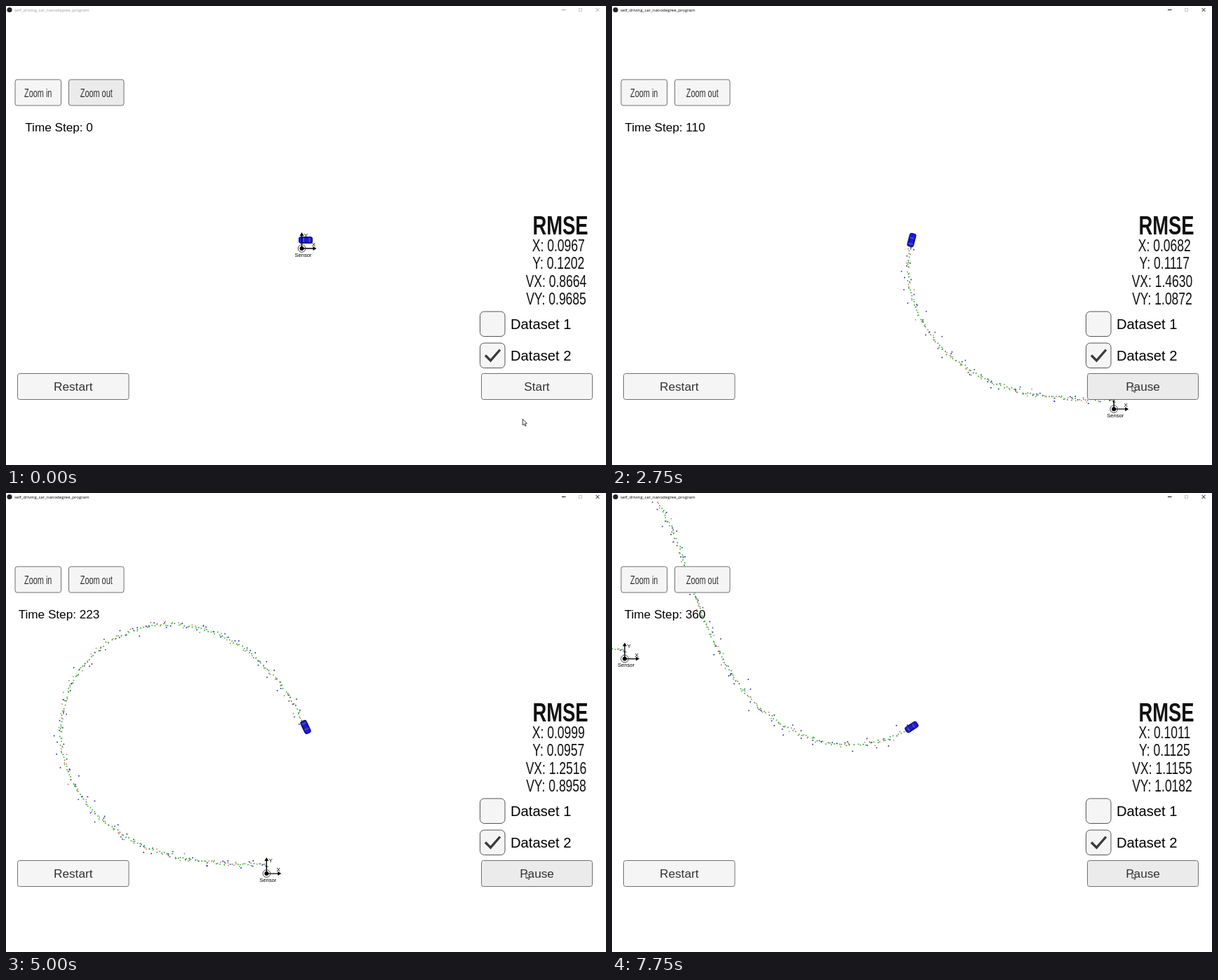
Animation, 855 px wide and 655 px high, one loop 8 s. Source, as an HTML page with a canvas:

```html
<!DOCTYPE html>
<html>
<head>
<meta charset="utf-8">
<style>
  html, body { margin: 0; width: 100%; height: 100%; overflow: hidden; background: #fff; }
  canvas { display: block; }
</style>
</head>
<body>
<canvas id="stage" width="855" height="655"></canvas>
<script>
const ctx = document.getElementById('stage').getContext('2d');
const LOOP = 8000, HOLD = 250, STEPS = 360;
const CAR = { x: 427, y: 334 };
const SANS = '"Liberation Sans", Arial, sans-serif';

// The car swings its heading like a pendulum at a nearly constant speed
const heading = step => 5.341 - 2.182 * Math.cos((step + 1) / 79.4);
const speed = step => 4.02 - .13 * Math.cos((step - 25) / 35);

// Car positions relative to the sensor
const path = [[5.5, -12]];
for (let k = 0; k < STEPS; k++) {
  const [x, y] = path[k], angle = heading(k + .5), length = speed(k + .5);
  path.push([x + length * Math.cos(angle), y + length * Math.sin(angle)]);
}

// Key readings: step, then X, Y, VX, VY
const readings = [
  [60, .0701, .1112, 1.8550, 1.2013],
  [110, .0682, .1117, 1.4630, 1.0872],
  [173, .0908, .0985, 1.2812, .9455],
  [260, .1067, .0936, 1.2297, .8590],
  [360, .1011, .1125, 1.1155, 1.0182]
];
const previousRun = [.0967, .1202, .8664, .9685];

function rmse(step) {
  if (step < 1) return previousRun;
  const i = readings.findIndex(row => row[0] >= step);
  const [end, ...values] = readings[i];
  // Velocity errors start high and settle with the number of samples
  if (i === 0) return values.map((v, k) => k > 1 ? v * Math.sqrt(end / step) : v);
  const [start, ...before] = readings[i - 1];
  return values.map((v, k) => before[k] + (v - before[k]) * (step - start) / (end - start));
}

function random(seed) {
  const v = Math.sin(seed * 12.9898) * 43758.5453;
  return v - Math.floor(v);
}
const noise = seed => random(seed) + random(seed + .31) + random(seed + .67) - 1.5;

function text(str, x, y, size, { color = '#000', align = 'center', squeeze = 1, font = SANS, weight = '' } = {}) {
  ctx.save();
  ctx.translate(x, y);
  ctx.scale(squeeze, 1);
  ctx.font = `${weight} ${size}px ${font}`;
  ctx.textAlign = align;
  ctx.fillStyle = color;
  ctx.fillText(str, 0, 0);
  ctx.restore();
}

function box(x, y, w, h, r, fill, stroke) {
  ctx.beginPath();
  ctx.roundRect(x, y, w, h, r);
  ctx.fillStyle = fill;
  ctx.fill();
  ctx.strokeStyle = stroke;
  ctx.stroke();
}

function poly(points, { fill, stroke, width = 1, close = false }) {
  ctx.beginPath();
  points.forEach(([x, y]) => ctx.lineTo(x, y));
  if (close) ctx.closePath();
  if (fill) {
    ctx.fillStyle = fill;
    ctx.fill();
  }
  if (stroke) {
    ctx.strokeStyle = stroke;
    ctx.lineWidth = width;
    ctx.stroke();
    ctx.lineWidth = 1;
  }
}

function disc(x, y, r, fill) {
  ctx.beginPath();
  ctx.arc(x, y, r, 0, 7);
  ctx.fillStyle = fill;
  ctx.fill();
}

function button(label, x, y, w, hot, squeeze = 1) {
  box(x, y, w, 37, 3, hot ? '#ebebeb' : '#f5f5f5', '#707070');
  text(label, x + w / 2, y + (squeeze < 1 ? 25 : 24.5), squeeze < 1 ? 16 : 17.2, { color: '#323232', squeeze });
}

function trail(step) {
  for (let k = 1; k <= step; k++) {
    const [x, y] = path[k], radar = k % 2;
    const spread = radar ? 10 : 5;
    disc(x + noise(k + .1) * spread, y + noise(k + .5) * spread, radar ? .95 : .85, radar ? '#3030b0' : '#d8605c');
    disc(x + noise(k + .2) * 2.2, y + noise(k + .8) * 2.2, .95, '#2fae2f');
  }
}

function car(angle) {
  ctx.save();
  ctx.translate(CAR.x, CAR.y);
  ctx.rotate(angle);
  box(-9.5, -4.5, 19, 9, 3, '#1818e8', '#0a0a78');
  for (const x of [-5.5, 3]) poly([[x, -3], [x, 3]], { stroke: '#55556a', width: 2 });
  for (const y of [-3.3, 3.3]) poly([[-4, y], [2, y]], { stroke: '#0a0a50', width: .8 });
  ctx.restore();
}

function sensor() {
  poly([[0, -19], [0, 0], [17, 0]], { stroke: '#000', width: 1.4 });
  poly([[-3, -18], [3, -18], [0, -23]], { fill: '#000' });
  poly([[16, -3], [16, 3], [21, 0]], { fill: '#000' });
  ctx.beginPath();
  ctx.arc(0, 0, 5.3, 0, 7);
  ctx.strokeStyle = '#444';
  ctx.stroke();
  disc(0, 0, 3, '#000');
  text('Y', 6, -16, 8);
  text('X', 17, -3, 8);
  text('Sensor', 2, 11.5, 7.6);
}

function titleBar(active) {
  const color = active ? '#000' : '#999';
  ctx.fillStyle = '#fff';
  ctx.fillRect(0, 0, 855, 11);
  disc(5, 5.5, 3.6, '#222');
  text('self_driving_car_nanodegree_program', 12, 7.5, 6.03, { color, align: 'left', font: '"Open Sans", sans-serif' });
  poly([[792, 5.5], [797.5, 5.5]], { stroke: color });
  ctx.strokeStyle = '#ccc';
  ctx.strokeRect(816.5, 3.5, 4, 4);
  poly([[840.5, 3], [845.5, 8]], { stroke: color, width: .9 });
  poly([[845.5, 3], [840.5, 8]], { stroke: color, width: .9 });
}

function scores(step) {
  text('RMSE', 790, 325.5, 37, { weight: 'bold', squeeze: .74, color: '#111' });
  rmse(step).forEach((value, i) => {
    const label = ['X', 'Y', 'VX', 'VY'][i];
    text(`${label}: ${value.toFixed(4)}`, i < 2 ? 787.3 : 784, 349.5 + i * 25.5, 23.5, { squeeze: .745, color: '#111' });
  });
}

function checkbox(label, y, checked) {
  box(675.5, y, 35.5, 35.5, 6, '#f5f5f5', '#555');
  if (checked) poly([[683, y + 17.5], [690.5, y + 25], [704, y + 9.5]], { stroke: '#3a3a3a', width: 3.4 });
  text(label, 719, y + 24.5, 20.2, { align: 'left' });
}

function cursor(x, y) {
  const arrow = [[0, 0], [0, 8.6], [2, 6.9], [3.4, 10], [4.8, 9.4], [3.5, 6.4], [6, 6.2]];
  poly(arrow.map(([dx, dy]) => [x + dx, y + dy]), { fill: '#fff', stroke: '#222', width: .9, close: true });
}

function draw(t) {
  const running = t >= 500, hover = t >= 250;
  const step = Math.max(0, Math.round((t - 550) / 20));
  const [x, y] = path[step];
  const inWorld = paint => {
    ctx.save();
    ctx.translate(CAR.x - x, CAR.y - y);
    paint(step);
    ctx.restore();
  };

  ctx.fillStyle = '#fff';
  ctx.fillRect(0, 0, 855, 655);
  inWorld(trail);
  car(heading(step));
  inWorld(sensor);

  titleBar(running);
  button('Zoom in', 13, 105, 65.5, false, .68);
  button('Zoom out', 89.5, 105, 78.5, !running, .68);
  text('Time Step: ' + step, 75.5, 179, 17.15);
  scores(step);
  checkbox('Dataset 1', 436, false);
  checkbox('Dataset 2', 481, true);
  button('Restart', 16.5, 524.5, 158.5, false);
  button(running ? 'Pause' : 'Start', 677.5, 524.5, 158, hover);
  if (hover) cursor(741, 541.5);
  else cursor(736.3, 589.5);
}

function tick() {
  const t = performance.now() % LOOP;
  draw(Math.floor(t / HOLD) * HOLD);
  requestAnimationFrame(tick);
}
tick();
</script>
</body>
</html>
```
